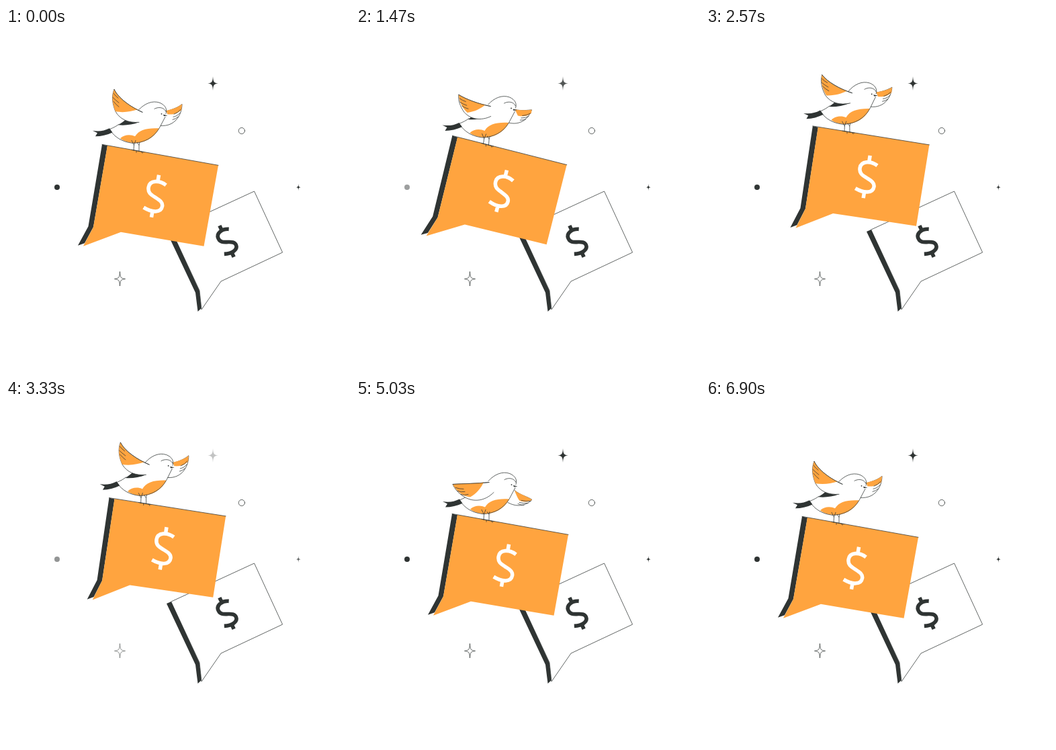
An HTML page for the animation above (7.6 s loop, 512 px wide and 512 px high).

```html
<!DOCTYPE html>
<html lang="en">
<head>
<meta charset="utf-8">
<title>Bird on a bubble</title>
<style>
  html, body { margin: 0; width: 100%; height: 100%; overflow: hidden; background: #fff; }
  svg { display: block; width: 100%; height: 100%; }
  .ink { fill: #2f3433; }
  .orange { fill: #ffa43f; }
  .white { fill: #fff; }
  .line { fill: none; }
  .line, .edge { stroke: #2f3433; stroke-width: .75; stroke-linecap: round; stroke-linejoin: round; }
  .sign { fill: none; }
</style>
</head>
<body>
<svg viewBox="0 0 512 512">
  <defs>
    <path id="dollar" d="M13,-19C2,-25 -12,-22 -12,-11.500C-12,-3 -6,-1 0,1.500C7,4.500 13,6.500 13,13C13,23 0,25 -14,19.500M0,-32V-21M0,22V32"/>
    <path id="star" d="M0,-10.500C.6,-2.200 1.200,-.8 8,0C1.200,.8 .6,2.200 0,10.500C-.6,2.200 -1.200,.8 -8,0C-1.200,-.8 -.6,-2.200 0,-10.500Z"/>
  </defs>

  <use id="bigStar" href="#star" class="ink" x="308" y="82.500"/>
  <use id="openStar" href="#star" class="white edge" x="169.500" y="373.500"/>
  <g id="smallStar"><use href="#star" class="ink" transform="translate(435.200 237) scale(.48)"/></g>
  <circle id="dot" class="ink" cx="76" cy="237" r="4"/>
  <circle class="white edge" cx="350.800" cy="153" r="4.600"/>

  <path class="ink" d="M239,303L246,300L288,391L291,417L285.500,422L282,394Z"/>
  <path class="white edge" d="M246,300L369.500,243L411.500,334L320,377L291,419L288,391Z"/>
  <use href="#dollar" class="sign" stroke="#2f3433" stroke-width="7" transform="translate(328.500 317.500) rotate(-24.500) scale(.8)"/>

  <g id="bubble">
    <path class="ink" d="M143,173L151,175L130,296L117,320L107,323.500L122.500,295Z"/>
    <path class="orange" d="M151,174.500L316,204L294.500,324.500L171,303.500L115,324.500L130,296Z"/>
    <path class="line" d="M143,173L316,204"/>
    <use href="#dollar" class="sign" stroke="#fff" stroke-width="5.500" transform="translate(222 250) rotate(10)"/>
  </g>

  <g id="bird">
    <path id="farWing" class="white edge"/>
    <path id="farTip" class="orange"/>
    <path id="farFeathers" class="line"/>
    <path class="ink" d="M129,152.500C138,154 146,153 154,149L159,155C150,159 142,161 133,161L136,156Z"/>
    <path class="white" d="M155,150C170,143 188,132 197,122C206,112 218,107 229,111C238,115 240,121 238,128L228,149C220,163 205,171 188,171C172,169 162,162 155,150Z"/>
    <path class="orange" d="M170,164C176,158 186,158 192,161C198,151 210,148 228,149C220,164 206,171 190,171C182,170 175,168 170,164Z"/>
    <path class="line" d="M155,150C160,148 164,146 168,143M197,122C206,112 218,107 229,111C238,115 240,121 238,127M221,120C226,117 235,117 238,124M237,132L228,149C220,163 205,171 188,171C172,169 162,162 155,152"/>
    <path class="ink" d="M234,128.500L240.500,130L235,131Z"/>
    <circle class="ink" cx="231.500" cy="127.500" r=".9"/>
    <path class="ink" d="M167,144C172,141 176,138 178,136C184,139 191,140 198,140C188,144 176,145 167,144Z"/>
    <path id="nearWing" class="white edge"/>
    <path id="nearTip" class="orange"/>
    <path id="nearLine" class="line"/>
    <path id="nearFeathers" class="line"/>
  </g>
  <path id="legs" class="line" d="M187,167L190.500,174L190,182M193,167L190.500,174M195,170L198,174L198,183M199,170L198,174M187,181L205,184.500M194,183V185M202,184L203,186"/>
</svg>
<script>
const LOOP = 7600, ACTIVE = 6900, FLAP = ACTIVE / 6, TWINKLE = 637, TWINKLE_END = 6370;
const el = id => document.getElementById(id);
const mix = (a, b, k) => a + (b - a) * k;
const smooth = k => { k = Math.max(0, Math.min(1, k)); return k * k * (3 - 2 * k); };

// flight of the perch: time, x, y, tilt of the bubble
const keys = [
  [0, 0, 0, 0],
  [1000, 0, 0, 0],
  [1470, -.5, -7.5, 4.1],
  [2350, 14, -26, -.5],
  [2570, 16, -27.7, -1],
  [4070, 3.5, -26, -1.3],
  [4300, 2.5, -26, -1],
  [4950, 0, 0, 0],
  [ACTIVE, 0, 0, 0]
];

// wing shapes: raised, lowered
const wings = {
  nearWing: ["M203,125C185,117 167,104 161,91C157,101 158,112 163,124C170,136 182,141 198,140",
             "M198,124C180,126 160,126 144,127C147,134 152,140 160,145C172,153 190,154 205,139"],
  nearTip: ["M161,91C166,102 180,114 196,121C186,124 176,126 163,124C158,112 157,101 161,91Z",
            "M144,127C158,126 175,126 190,124C186,133 179,141 170,146C159,145 150,138 144,127Z"],
  nearLine: ["M203,125C185,117 167,104 161,91", "M198,124C180,126 160,126 144,127"],
  nearFeathers: ["M160,97Q163,101 167,104M159,103Q163,107 168,111M160,109Q163,113 168,117",
                 "M148,132Q154,134 160,134M151,137Q156,139 162,138M156,142Q161,144 167,142"],
  farWing: ["M237,124C248,121 256,118 262,113C262,128 252,147 230,145",
            "M236,136C246,144 255,145 262,150C252,160 238,161 226,154"],
  farTip: ["M262,113C256,118 246,121 237,123C240,125 240,127 240,128C249,129 255,127 261,122Z",
           "M262,150C255,145 246,143 236,136C238,142 240,146 243,151C250,154 256,154 262,150Z"],
  farFeathers: ["M260,121Q256,126 250,128M259,126Q255,131 249,132M256,132Q253,135 248,136",
                "M260,152Q253,153 246,151M256,155Q250,156 243,154M250,158Q246,158 241,156"]
};

// twinkle: centre, half width, depth
const twinkles = {
  bigStar: [.185, .15, 1],
  openStar: [.15, .12, .8],
  smallStar: [.15, .12, .8],
  dot: [.28, .25, .6]
};

function morph(from, to, k) {
  const ends = to.match(/-?[\d.]+/g);
  let i = 0;
  return from.replace(/-?[\d.]+/g, n => mix(+n, +ends[i++], k).toFixed(2));
}

const slope = (i, j) => (keys[i + 1][j] - keys[i][j]) / (keys[i + 1][0] - keys[i][0]);

// tangent that never overshoots a key
function tangent(i, j) {
  if (i === 0 || i === keys.length - 1) return 0;
  const a = slope(i - 1, j), b = slope(i, j);
  return a * b > 0 ? 2 * a * b / (a + b) : 0;
}

function flight(t, j) {
  const i = Math.max(0, keys.findIndex(key => key[0] >= t) - 1);
  const span = keys[i + 1][0] - keys[i][0], k = (t - keys[i][0]) / span;
  return mix(keys[i][j], keys[i + 1][j], smooth(k))
    + span * k * (1 - k) * ((1 - k) * tangent(i, j) - k * tangent(i + 1, j));
}

function place(id, x, y, angle, pivot) {
  el(id).setAttribute("transform", `translate(${x} ${y}) rotate(${angle} ${pivot})`);
}

function draw(now) {
  const t = Math.min(now % LOOP, ACTIVE);

  // each downstroke lifts the bird, then it sinks slowly
  const beat = t / FLAP % 1;
  const lowered = smooth((beat - .19) / .19) - smooth((beat - .52) / .2);
  const stroke = (beat + .88) % 1;
  const lift = smooth(stroke / .3) - smooth((stroke - .6) / .4);

  const x = flight(t, 1), y = flight(t, 2) + 1.5 - 5.5 * lift, tilt = flight(t, 3);
  place("bubble", x, y, tilt, "195 183");
  place("legs", x, y, tilt, "195 183");
  place("bird", x, y + 2.2 * lowered, -x / 8, "190 150");
  for (const id in wings) el(id).setAttribute("d", morph(...wings[id], lowered));

  const phase = t < TWINKLE_END ? t / TWINKLE % 1 : 0;
  for (const id in twinkles) {
    const [centre, width, depth] = twinkles[id];
    el(id).setAttribute("opacity", 1 - depth * Math.max(0, 1 - Math.abs(phase - centre) / width));
  }
}

function tick() {
  draw(performance.now());
  requestAnimationFrame(tick);
}
tick();
</script>
</body>
</html>
```
